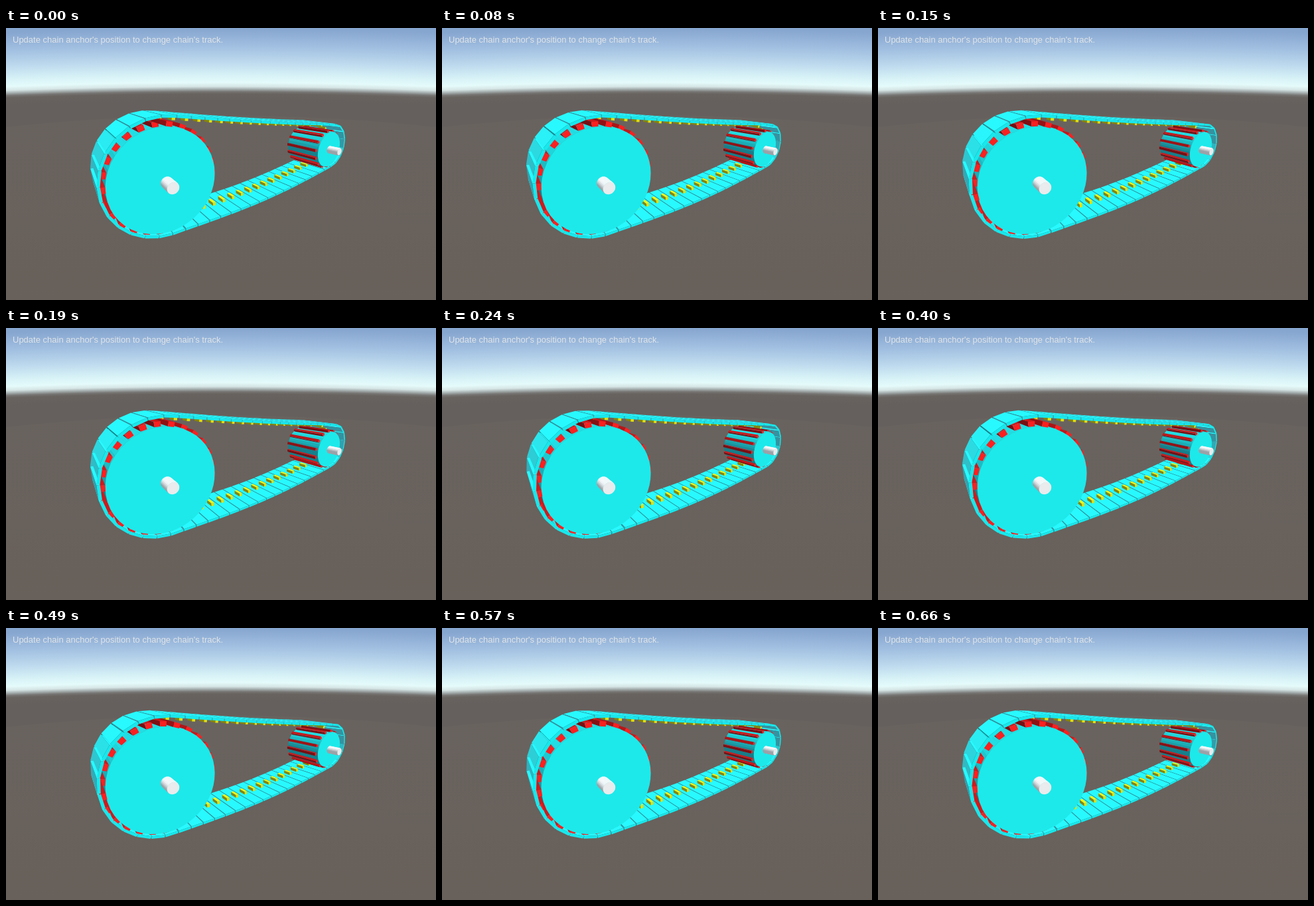
These frames come from a looping animation (648 by 409 pixels, 0.71 s). An HTML page with a canvas:

```html
<!DOCTYPE html>
<html lang="en">
<head>
<meta charset="utf-8">
<title>Chain track</title>
<style>
  html, body { margin: 0; width: 100%; height: 100%; overflow: hidden; background: #69625d; }
  canvas { position: absolute; left: 0; top: 0; display: block; }
  p {
    position: absolute; left: 10px; top: 10px; margin: 0; white-space: nowrap;
    font: 13px/16px "Liberation Sans", Arial, sans-serif; color: #e0e4e8;
  }
</style>
</head>
<body>
<canvas id="stage" width="648" height="409"></canvas>
<p>Update chain anchor's position to change chain's track.</p>
<script>
const ctx = document.getElementById('stage').getContext('2d');
const TAU = Math.PI * 2, RAD = Math.PI / 180;
const LOOP = 710;
const STEPS = [0, 30, 70, 110, 150, 190, 240, 280, 320, 360, 400, 450, 490, 540, 570, 620, 660];
const LINKS_PER_STEP = 0.37;

// Camera: the track lies in an upright plane (x, y); z runs along the wheel axes.
const FOCAL = 354, PITCH = 16.9 * RAD, YAW = 32.3 * RAD;
const sp = Math.sin(PITCH), cp = Math.cos(PITCH), sy = Math.sin(YAW), cy = Math.cos(YAW);
const ORIGIN = [-81.5, -28, FOCAL];
const AX = [cy, sy * sp, sy * cp], AY = [0, cp, -sp], AZ = [-sy, cy * sp, cy * cp];

function project([x, y], z) {
  const [px, py, pz] = ORIGIN.map((o, i) => o + x * AX[i] + y * AY[i] + z * AZ[i]);
  return [324 + FOCAL * px / pz, 204.5 - FOCAL * py / pz];
}

const LINK = { dark: [54, 146, 160], bright: [40, 249, 254], cap: '#18e8ec' };
const GAP = { dark: [16, 96, 104], bright: [10, 100, 106] };
const DRUM = { dark: [22, 126, 138], bright: [34, 222, 228], cap: '#1de9ea', seam: true };
const BAR = { dark: [118, 15, 19], bright: [206, 26, 28], cap: '#fa2020' };
const TOOTH = { dark: [130, 130, 14], bright: [246, 246, 18], end: '#85850f', cap: '#e0e010' };
const ROD = { dark: [160, 160, 166], bright: [248, 248, 250], cap: '#e9ebec', seam: true };

function shade({ dark, bright }, ny) {
  const t = Math.min(1, Math.max(0, 0.1 + 1.2 * ny));
  return `rgb(${dark.map((d, i) => Math.round(d + (bright[i] - d) * t))})`;
}

function fill(pts, color, seam) {
  ctx.beginPath();
  pts.forEach(p => ctx.lineTo(p[0], p[1]));
  ctx.closePath();
  ctx.fillStyle = color;
  ctx.fill();
  if (seam) {
    ctx.strokeStyle = color;
    ctx.lineWidth = 0.6;
    ctx.stroke();
  }
}

function faces(a, b, backA) {
  return (b[0] - a[0]) * (backA[1] - a[1]) - (b[1] - a[1]) * (backA[0] - a[0]) > 0;
}

// Visible side walls of a counterclockwise outline extruded from z0 (near) to z1 (far).
function walls(outline, z0, z1, look) {
  const near = outline.map(p => project(p, z0));
  const far = outline.map(p => project(p, z1));
  outline.forEach((p, i) => {
    const j = (i + 1) % outline.length, q = outline[j];
    if (!faces(near[i], near[j], far[i])) return;
    const ny = (p[0] - q[0]) / Math.hypot(q[0] - p[0], q[1] - p[1]);
    const color = look.end && i % 2 ? look.end : shade(look, ny);
    fill([near[i], near[j], far[j], far[i]], color, look.seam);
  });
}
const cap = (outline, z, look) => fill(outline.map(p => project(p, z)), look.cap);

function prism(outline, z0, z1, look) {
  walls(outline, z0, z1, look);
  cap(outline, z0, look);
}

const polar = (c, r, a) => [c[0] + r * Math.cos(a), c[1] + r * Math.sin(a)];
const circle = (c, r, n) => Array.from({ length: n }, (_, i) => polar(c, r, i * TAU / n));

// Belt path: lower run, small arc, upper run, big arc.
const FRONT = -5, BACK = 88, LINKS = 56, THICK = 4, TURN = 84 * RAD;
const BIG = { c: [1, 6], r: 95 }, SMALL = { c: [402, 8], r: 53 };
const path = [];

function arc({ c, r }, from, to) {
  for (let i = 0; i <= 80; i++) path.push(polar(c, r, from + (to - from) * i / 80));
}
function run(p, q, sag) {
  for (let i = 1; i < 60; i++) {
    const t = i / 60;
    path.push([p[0] + (q[0] - p[0]) * t, p[1] + (q[1] - p[1]) * t - sag * Math.sin(Math.PI * t)]);
  }
}
const edge = (w, a) => polar(w.c, w.r, a);
path.push(edge(BIG, -TURN));
run(edge(BIG, -TURN), edge(SMALL, -TURN), 11);
arc(SMALL, -TURN, TURN);
run(edge(SMALL, TURN), edge(BIG, TURN), 2.5);
arc(BIG, TURN, TAU - TURN);

const dist = [0];
for (let i = 1; i < path.length; i++) {
  dist.push(dist[i - 1] + Math.hypot(path[i][0] - path[i - 1][0], path[i][1] - path[i - 1][1]));
}
const total = dist[dist.length - 1], pitch = total / LINKS;

function at(s) {
  s = (s % total + total) % total;
  let i = 1;
  while (i < dist.length - 1 && dist[i] < s) i++;
  const t = (s - dist[i - 1]) / (dist[i] - dist[i - 1]), a = path[i - 1], b = path[i];
  return [a[0] + (b[0] - a[0]) * t, a[1] + (b[1] - a[1]) * t];
}

function makeLink(s) {
  const a = at(s), b = at(s + pitch);
  const len = Math.hypot(b[0] - a[0], b[1] - a[1]);
  const tx = (b[0] - a[0]) / len, ty = (b[1] - a[1]) / len;
  const local = (l, h) => [(a[0] + b[0]) / 2 + tx * l + ty * h, (a[1] + b[1]) / 2 + ty * l - tx * h];
  const box = (l, out, inn) => [local(-l, out), local(l, out), local(l, inn), local(-l, inn)];
  return {
    gap: box(len / 2, -0.8, 0.8 - THICK),
    plate: box(len / 2 - 0.8, 0, -THICK),
    tooth: box(2.9, -THICK, -THICK - 6.5),
    outer: faces(project(a, 0), project(b, 0), project(a, BACK))
  };
}
const drawGap = l => walls(l.gap, FRONT + 1, BACK - 1, GAP);
const drawPlate = l => walls(l.plate, FRONT, BACK, LINK);
const drawFront = l => cap(l.plate, FRONT, LINK);
const drawTooth = l => prism(l.tooth, 36, 54, TOOTH);

function wheel({ c, r, top, teeth, start, fat, inset }, shift) {
  const gap = TAU / teeth, half = gap * fat / 2;
  const bars = Array.from({ length: teeth }, (_, i) => {
    const a = start + (i + shift) * gap, lo = a - half, hi = a + half;
    const pts = [polar(c, top, lo), polar(c, top, hi), polar(c, r - 1, hi), polar(c, r - 1, lo)];
    return { pts, outer: faces(project(pts[0], 0), project(pts[1], 0), project(pts[0], BACK)) };
  });
  const draw = b => prism(b.pts, inset, BACK, BAR);
  bars.filter(b => !b.outer).forEach(draw);
  prism(circle(c, r, 48), 0, BACK, DRUM);
  bars.filter(b => b.outer).forEach(draw);
}

const WHEELS = [
  { c: [401, 0], r: 42, top: 46.5, teeth: 14, start: 177 * RAD, fat: 0.3, inset: 4, rod: 8 },
  { c: [0, 0], r: 84, top: 90.5, teeth: 26, start: 95 * RAD, fat: 0.46, inset: 10, rod: 9.2 }
];

// Slightly curved horizon: gradients around a far centre below the stage.
function backdrop() {
  const R = 8748, mid = 324, base = 93 + R;
  const sky = ctx.createRadialGradient(mid, base, R - 17, mid, base, R + 93);
  const stops = [
    [0, '#65605d'], [0.1, '#68635f'], [0.13, '#767573'], [0.165, '#a6afaf'], [0.2, '#d6e5e5'],
    [0.255, '#e5fbfb'], [0.364, '#d6f1f6'], [0.53, '#bedaee'], [0.745, '#a2c0e1'], [1, '#86a5cf']
  ];
  stops.forEach(([p, color]) => sky.addColorStop(p, color));
  ctx.fillStyle = sky;
  ctx.fillRect(0, 0, 648, 409);
  const ground = ctx.createLinearGradient(0, 130, 0, 409);
  ground.addColorStop(0, '#69635f');
  ground.addColorStop(1, '#68605a');
  ctx.fillStyle = ground;
  ctx.beginPath();
  ctx.moveTo(0, 149);
  ctx.quadraticCurveTo(324, 114, 648, 149);
  ctx.lineTo(648, 409);
  ctx.lineTo(0, 409);
  ctx.fill();
}

function draw(step) {
  const shift = step * LINKS_PER_STEP;
  const offset = (0.6 + shift) % 1;
  const links = Array.from({ length: LINKS }, (_, k) => makeLink((k + offset) * pitch));
  const inner = links.filter(l => !l.outer).reverse();
  const outer = links.filter(l => l.outer);

  backdrop();
  inner.forEach(drawGap);
  inner.forEach(drawPlate);
  links.reverse().forEach(drawTooth);
  WHEELS.forEach(w => wheel(w, shift));
  outer.forEach(drawGap);
  outer.forEach(drawPlate);
  links.forEach(drawFront);
  WHEELS.forEach(w => prism(circle(w.c, w.rod, 28), -26, 0, ROD));
}

let shown = -1;
function tick() {
  const t = performance.now() % LOOP;
  let step = STEPS.length - 1;
  while (STEPS[step] > t) step--;
  if (step !== shown) draw(shown = step);
  requestAnimationFrame(tick);
}
tick();
</script>
</body>
</html>
```
